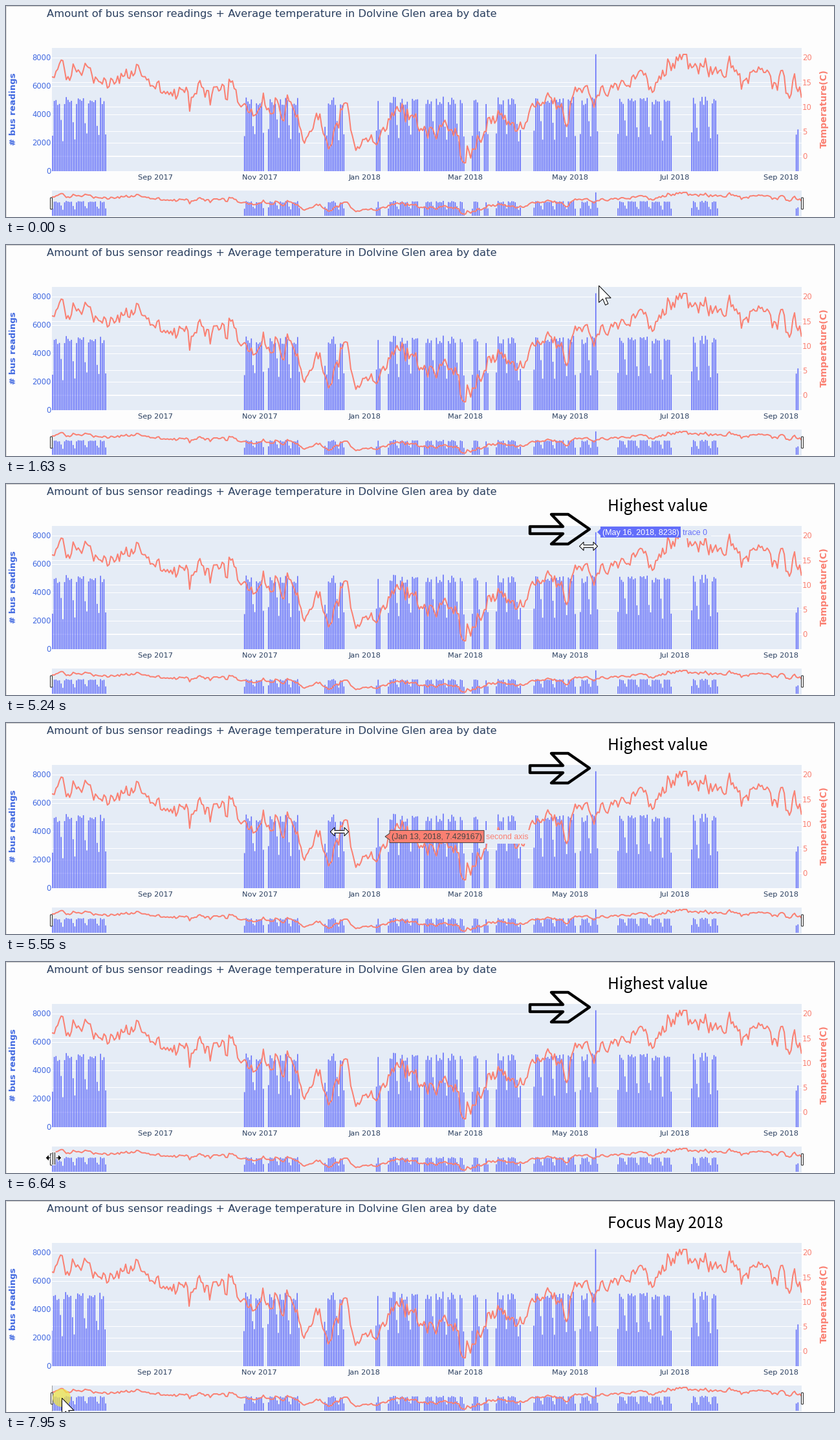
Write a matplotlib script that moves like this. It is 1280 by 327 pixels and loops after 8 s.

```python
import numpy as np
import matplotlib.pyplot as plt
from matplotlib.animation import FuncAnimation
from matplotlib.collections import PolyCollection
from matplotlib.patches import Circle, FancyBboxPatch, Polygon, Rectangle

W, H, DPI = 1280, 327, 64
LOOP, STEP = 8000, 40
LEFT, RIGHT, TOP, BASE = 71, 1230, 65.5, 256
SLIDER_TOP, SLIDER_SCALE = 287, 0.2
DAY, DAYS = 2.649, 438
PEAK_DAY, PEAK_COUNT = 317, 8238
PAGE, PLOT, INK = "#fdfdfd", "#e5ecf6", "#2a3f5f"
BLUE, SALMON, ROYAL = "#636efa", "#fa8072", "#4169e1"

rng = np.random.default_rng(11)

fig = plt.figure(figsize=(W / DPI, H / DPI), dpi=DPI, facecolor=PAGE)
ax = fig.add_axes([0, 0, 1, 1])
ax.set_xlim(0, W)
ax.set_ylim(H, 0)
ax.axis("off")


def px(n):
    return n * 72 / DPI


def text(x, y, s, size, color=INK, font="DejaVu Sans", **kw):
    return ax.text(x, y, s, fontsize=px(size), color=color, family=font, **kw)


def rect(x0, y0, x1, y1, color, z=1):
    return ax.add_patch(Rectangle((x0, y0), x1 - x0, y1 - y0, fc=color, lw=0, zorder=z))


def day_x(day):
    return LEFT + 1 + DAY * day


def count_y(count):
    return BASE - 0.022 * count


def degrees_y(degrees):
    return 232.5 - 7.625 * degrees


def to_slider(y):
    return SLIDER_TOP + (y - TOP) * SLIDER_SCALE


# Periods with sensor data; day 0 is a Monday.
PERIODS = [(0, 31), (112, 123), (126, 144), (159, 170), (189, 191), (196, 214), (217, 240),
           (245, 249), (252, 254), (259, 273), (281, 305), (308, 318), (330, 361), (373, 388),
           (434, 435)]


def daily_count(day, first, last):
    """Weekday level, quieter weekends, partial days at the ends of a period."""
    level = {5: 3350, 6: 2370}.get(day % 7, 4950)
    if day in (first, last) and level > 4000:
        level *= 0.55
    return level + rng.uniform(-300, 300)


counts = {day: daily_count(day, first, last)
          for first, last in PERIODS for day in range(first, last + 1)}
counts[PEAK_DAY] = PEAK_COUNT
bar_x = day_x(np.array(list(counts)))
bar_top = count_y(np.array(list(counts.values())))

# Temperature: the seasonal course through a few key points plus day-to-day weather.
COURSE = np.array([(72, 110), (103, 102), (215, 108), (260, 142), (345, 122), (390, 165),
                   (443, 150), (460, 212), (485, 160), (498, 225), (526, 148), (542, 220),
                   (575, 195), (622, 162), (650, 206), (685, 175), (710, 240), (748, 175),
                   (795, 190), (838, 132), (866, 175), (885, 125), (912, 148), (938, 116),
                   (1008, 122), (1026, 88), (1119, 90), (1137, 125), (1163, 95), (1230, 140)])
temp_x = day_x(np.arange(DAYS))
weather = np.zeros(DAYS)
for day in range(1, DAYS):
    weather[day] = 0.6 * weather[day - 1] + rng.normal(0, 8)
temp_y = np.clip(np.interp(temp_x, *COURSE.T) + weather, 75, 247)


def bar_polys(xs, tops, base, half=0.8):
    return [[(x - half, base), (x - half, y), (x + half, y), (x + half, base)]
            for x, y in zip(xs, tops)]


def add_bars(tops, base):
    polys = PolyCollection(bar_polys(bar_x, tops, base), fc=BLUE, lw=0, zorder=3, snap=False)
    return ax.add_collection(polys, autolim=False)


def add_curve(ys):
    return ax.plot(temp_x, ys, color=SALMON, lw=px(2), zorder=5, solid_joinstyle="round")[0]


def gridline(y, lw=1.0):
    ax.plot([LEFT, RIGHT], [y, y], color="white", lw=px(lw), zorder=2)


# Chart
rect(0, 0, W, 1, "#c9c9c9")
rect(0, 0, 1, H, "#d4d4d4")
plot_area = rect(LEFT, TOP - 0.5, RIGHT, BASE, PLOT)
for count in range(0, 8001, 2000):
    y = count_y(count)
    gridline(y)
    text(70, y + 4.5, str(count), 11.6, ROYAL, ha="right")
for degrees in range(0, 21, 5):
    y = degrees_y(degrees)
    gridline(y, 1.0 if degrees else 1.8)
    text(1231, y + 4.5, str(degrees), 11.6, SALMON)

bars = add_bars(bar_top, BASE)
temp_line = add_curve(temp_y)
for artist in (bars, temp_line):
    artist.set_clip_path(plot_area)

MONTHS = {"Sep 2017": 60, "Nov 2017": 121, "Jan 2018": 182, "Mar 2018": 241,
          "May 2018": 302, "Jul 2018": 363, "Sep 2018": 425}
month_labels = [text(day_x(day), 269, name, 11.4, ha="center") for name, day in MONTHS.items()]

text(63, 16.5, "Amount of bus sensor readings + Average temperature in Dolvine Glen area by date", 16.39)
for x, label, size, color in ((12, "# bus readings", 13.2, ROYAL), (1265, "Temperature(C)", 13.7, SALMON)):
    text(x, 159.5, label, size, color, weight="bold", rotation=90, ha="center", va="center")

# Range slider
rect(LEFT, SLIDER_TOP - 1, RIGHT, 325.5, PLOT)
add_bars(to_slider(bar_top), to_slider(BASE))
add_curve(to_slider(temp_y))
trimmed = rect(70.5, SLIDER_TOP - 1, 71.5, 325.5, "#999999", 6)


def handle(x):
    return ax.add_patch(FancyBboxPatch((x - 1.5, 297), 3, 18, boxstyle="round,pad=0,rounding_size=1",
                                       fc="white", ec="#333333", lw=px(1.1), zorder=7))


left_handle = handle(70)
handle(1231)

# Annotations
big_arrow = ax.add_patch(Polygon(
    [(810, 66), (861, 66), (843, 47), (869, 47), (902, 70), (869, 93), (843, 93), (861, 77), (810, 77)],
    fill=False, ec="black", lw=px(4.4), joinstyle="round", zorder=8))
highest, focus = (text(930, 42, note, 24.4, "black", "Noto Sans CJK JP", zorder=8)
                  for note in ("Highest value", "Focus May 2018"))


def tooltip(tip, box, label, trace, trace_end, fill, ink, edge):
    (tx, ty), (x0, y0, x1, y1) = tip, box
    shape = [tip, (x0, ty - 5), (x0, y0), (x1, y0), (x1, y1), (x0, y1), (x0, ty + 5)]
    arial = "Liberation Sans"
    return [
        rect(x1, y0 - 1, trace_end, y1 + 1, PLOT, 9),
        ax.add_patch(Polygon(shape, fc=fill, ec=edge, lw=px(1), zorder=10)),
        text((x0 + x1) / 2, ty + 4.2, label, 12.5, ink, arial, ha="center", zorder=11),
        text(x1 + 3.5, ty + 4.2, trace, 12.4, fill, arial, zorder=11),
    ]


peak_tip = tooltip((914, 74.5), (919, 66, 1043, 83), "(May 16, 2018, 8238)", "trace 0", 1090,
                   BLUE, "white", "none")
temp_tip = tooltip((586, 176), (593, 166.5, 739, 185.5), "(Jan 13, 2018, 7.429167)", "second axis", 811,
                   SALMON, "#444444", "#444444")

# Mouse cursors, each drawn around its hot spot
MIRROR = np.array((-1, 1))
pointer = np.array([(0, 0), (0, 26), (6, 20.5), (10, 30), (14.3, 28), (10.3, 19), (18.5, 19)])
half_span = np.array([(0, -2), (-7.5, -2), (-7.5, -6.5), (-14, 0), (-7.5, 6.5), (-7.5, 2), (0, 2)])
half_split = np.array([(-12.5, 0), (-7, -5.5), (-7, -1.2), (-3.6, -1.2), (-3.6, 1.2), (-7, 1.2), (-7, 5.5)])
half_bar = np.array([(-2.6, -10), (-0.6, -10), (-0.6, 10), (-2.6, 10)])
SHAPES = {
    "arrow": [pointer],
    "span": [np.vstack([half_span, (half_span * MIRROR)[::-1]])],
    "split": [shape * side for shape in (half_split, half_bar) for side in (1, MIRROR)],
}
cursors = {}
for kind in SHAPES:
    fill, edge = ("black", "white") if kind == "split" else ("white", "black")
    cursors[kind] = PolyCollection([], fc=fill, ec=edge, lw=px(1), zorder=14)
    ax.add_collection(cursors[kind], autolim=False)
press = ax.add_patch(Circle((0, 0), 14, fc="#eee34a", alpha=0.75, lw=0, zorder=13))

# Straight mouse strokes: (start, stop, from, to); at rest between them.
STROKES = [
    (940, 1250, (924, -18), (924, 148)),
    (1250, 1640, (924, 148), (916, 62)),
    (1720, 2160, (917, 69), (914, 81)),
    (5240, 5550, (900, 96), (515, 168)),
    (5550, 6020, (515, 168), (110, 264)),
    (6090, 6470, (103, 272), (74.5, 302)),
    (6640, 7180, (73.5, 303.5), (71, 306)),
    (7710, 7940, (69, 306), (86, 305)),
]
HOLD = 77.5


def mouse(t):
    """Pointer position, refreshed once per HOLD."""
    start, stop, a, b = [stroke for stroke in STROKES if stroke[0] <= t][-1]
    held = HOLD * ((t - start + 10) // HOLD)
    part = min(held / (stop - start), 1)
    return np.array(a) + part * np.subtract(b, a)


def cursor_kind(t, y):
    if t >= 7780 or y < TOP:
        return "arrow"
    return "split" if y > 280 else "span"


def update(frame):
    t = frame * STEP + 30

    def show(artists, start, stop=LOOP):
        for artist in artists:
            artist.set_visible(start <= t < stop)

    show([big_arrow, highest], 2560, 6950)
    show([focus], 7180)
    show(peak_tip, 2020, 5390)
    show(temp_tip, 5470, 5680)
    show([press], 7710)

    for collection in cursors.values():
        collection.set_verts([])
    if t >= STROKES[0][0]:
        pos = mouse(t)
        kind = cursor_kind(t, pos[1])
        cursors[kind].set_verts([shape + pos for shape in SHAPES[kind]])
        press.center = tuple(pos)

    # Dragging the left handle trims the range by a fraction of a day.
    dragged = t >= 7940
    stretch = (RIGHT - LEFT + dragged) / (RIGHT - LEFT)

    def zoom(x):
        return RIGHT - (RIGHT - x) * stretch

    bars.set_verts(bar_polys(zoom(bar_x), bar_top, BASE))
    temp_line.set_xdata(zoom(temp_x))
    for label, day in zip(month_labels, MONTHS.values()):
        label.set_x(zoom(day_x(day)))
    left_handle.set_x(69.5 if dragged else 68.5)
    trimmed.set_visible(dragged)
    return []


anim = FuncAnimation(fig, update, frames=LOOP // STEP, interval=STEP, repeat=True, repeat_delay=0,
                     init_func=lambda: update(0))
plt.show()
```
